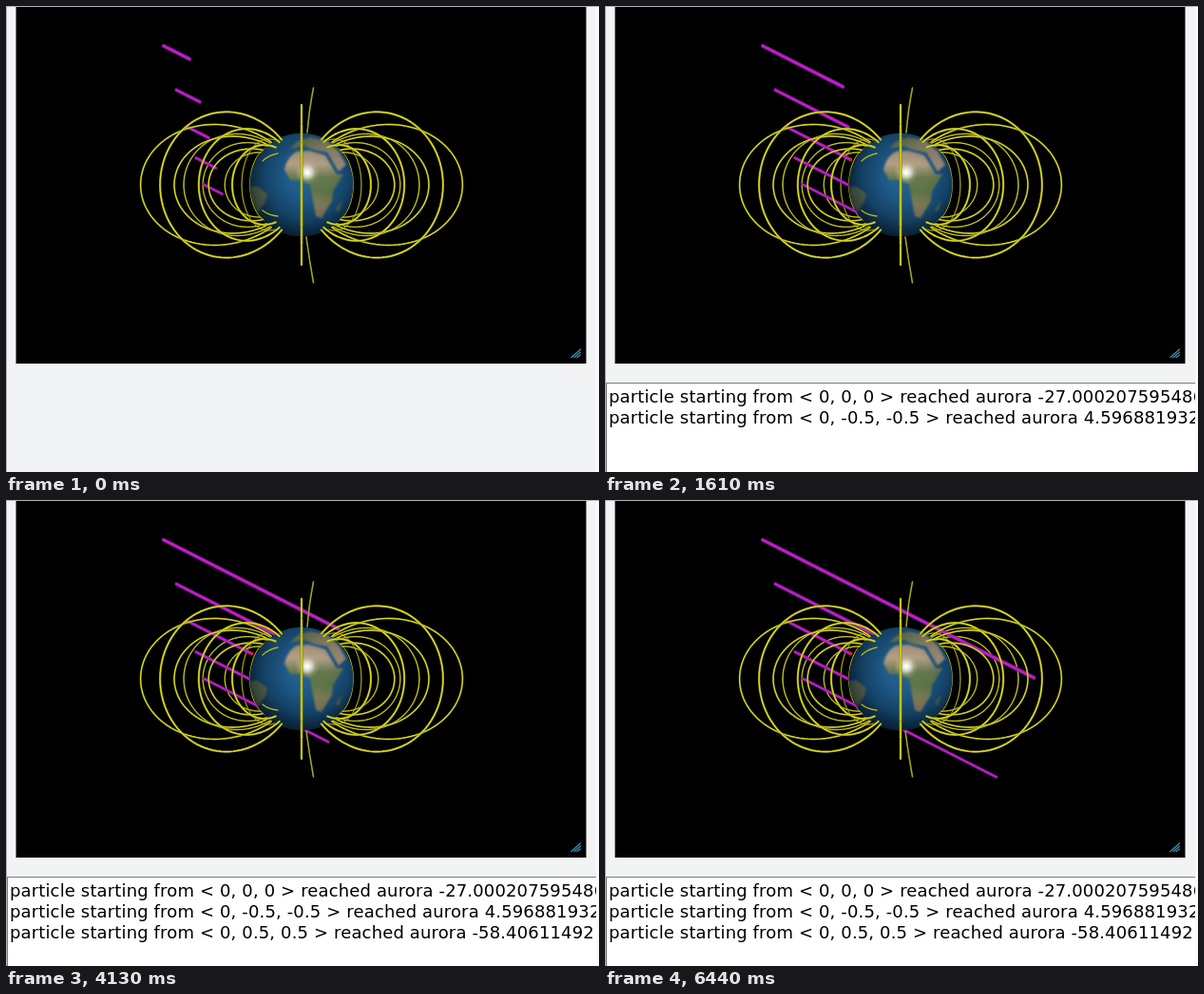
These frames come from a looping animation (624x490 px, 6510 ms). An HTML page with a canvas:

```html
<!DOCTYPE html>
<html lang="en">
<head>
<meta charset="utf-8">
<title>Charged particles in a dipole field</title>
<style>
  html, body { margin: 0; width: 100%; height: 100%; overflow: hidden; background: #f1f3f5; }
  canvas { display: block; width: 624px; height: 490px; }
  #log {
    position: absolute; left: 1px; top: 396px; width: 620px; height: 94px;
    box-sizing: border-box; border: solid #7c7c7c; border-width: 1px 0 0 1px;
    background: #fff; overflow: hidden; display: none;
  }
  #log div {
    position: relative; top: 3px; left: 2px; width: 617px; overflow: hidden; white-space: pre;
    font: 18px/22px Verdana, "DejaVu Sans", sans-serif; letter-spacing: .14px; color: #000;
  }
</style>
</head>
<body>
<canvas id="stage" width="624" height="490"></canvas>
<div id="log"></div>
<script>
const ctx = document.getElementById('stage').getContext('2d');
const log = document.getElementById('log');
const LOOP = 6510, STEP = 70;
const CX = 311, CY = 188, R = 54, EYE = 300;

// Particles that hit the globe, in order of arrival.
const hits = [
  { id: 2, at: 1540, from: '0, 0, 0', value: '-27.000207595486' },
  { id: 3, at: 1610, from: '0, -0.5, -0.5', value: '4.5968819322' },
  { id: 1, at: 2450, from: '0, 0.5, 0.5', value: '-58.40611492' }
];
for (const h of hits) {
  h.row = document.createElement('div');
  h.row.textContent = `particle starting from < ${h.from} > reached aurora ${h.value}`;
  log.appendChild(h.row);
}

function stroke(path, color, width) {
  ctx.strokeStyle = color;
  ctx.lineWidth = width;
  ctx.stroke(path);
}

function tube(path, edge, core, width) {
  stroke(path, edge, width);
  stroke(path, core, width * .55);
}

// Dipole field line r = L sin^2(a) outside the globe, seen in perspective.
function fieldLine(L, azimuth) {
  const path = new Path2D(), n = 80;
  const a0 = Math.asin(Math.sqrt(R / L));
  for (let i = 0; i <= n; i++) {
    const a = a0 + (Math.PI - 2 * a0) * i / n;
    const r = L * Math.sin(a) ** 2, h = r * Math.sin(a);
    const zoom = EYE / (EYE - h * Math.sin(azimuth));
    path.lineTo(CX + h * Math.cos(azimuth) * zoom, CY - r * Math.cos(a) * zoom);
  }
  return { path, depth: Math.sin(azimuth) };
}

const field = [];
for (const L of [150.5, 123, 93]) {
  for (let k = 0; k < 10; k++) field.push(fieldLine(L, (k + .5) * Math.PI / 5));
}
field.sort((a, b) => a.depth - b.depth);
const back = field.filter(f => f.depth < 0), front = field.filter(f => f.depth > 0);

const polar = new Path2D('M317 133Q319 108 323.5 86M316 243Q319 266 323.5 291');
const grazing = new Path2D('M270 163Q276 157 286 155M270 215Q276 220 286 221');

const africa = new Path2D('M293 172Q296 158 306 153L319 152 336 157 348 177H355L344 195 343 205 332 223 326 221 320 188 312 183 299 183Z');
const eurasia = new Path2D('M299 150L307 142 320 138 338 142 350 153 358 167 350 174 338 154 323 151 314 147Z');
const america = new Path2D('M257 190H265L275 198 273 206 265 218 259 206Z');
const madagascar = new Path2D('M354 204L350 217 347 214Z');

function drawField(lines) {
  for (const f of lines) tube(f.path, '#8b8b10', '#dfdf22', 1.6 + .8 * f.depth);
}

// Each particle starts one step further away, so it looks smaller by this factor.
const scaleOf = id => 1 / (1 + .1 * id);

function drawParticle(id, t) {
  const hit = hits.find(h => h.id === id);
  const s = scaleOf(id), sec = Math.min(t, hit ? hit.at : LOOP) / 1000;
  const x = 313 - 147 * s, y = 552 - 510 * s;
  const run = s * (27 + 34 * sec + .95 * sec * sec);
  const path = new Path2D();
  path.moveTo(x, y);
  path.lineTo(x + run, y + run * .508);
  tube(path, '#8a1494', '#be20cb', 3.9 * s + .3);
  if (hit && t >= hit.at) {
    ctx.fillStyle = '#e02418';
    ctx.beginPath();
    ctx.arc(x + run, y + run * .508, 1.8, 0, 7);
    ctx.fill();
  }
}

function gradient(g, colors) {
  colors.forEach((c, i) => g.addColorStop(i / (colors.length - 1), c));
  return g;
}

function glow(x, y, r0, r1, ...colors) {
  ctx.fillStyle = gradient(ctx.createRadialGradient(x, y, r0, x, y, r1), colors);
  ctx.fillRect(CX - R - 2, CY - R - 2, 2 * R + 4, 2 * R + 4);
}

function drawGlobe() {
  ctx.save();
  ctx.beginPath();
  ctx.arc(CX, CY, R + .3, 0, 7);
  ctx.clip();
  glow(317, 178, 4, 66, '#27648f', '#1e5a88', '#174b74', '#103550');
  ctx.filter = 'blur(0.8px)';
  ctx.fillStyle = gradient(ctx.createLinearGradient(0, 152, 0, 223),
    ['#a08d76', '#b49f86', '#66794f', '#5c7548', '#84805a', '#857a5c']);
  ctx.fill(africa);
  ctx.fillStyle = gradient(ctx.createLinearGradient(315, 142, 350, 168), ['#66704f', '#8a8268', '#a5927c']);
  ctx.fill(eurasia);
  ctx.fillStyle = '#5b694f';
  ctx.fill(america);
  ctx.fill(madagascar);
  ctx.filter = 'none';
  glow(316, 180, 22, 68, 'rgba(0,10,20,0)', 'rgba(0,10,20,.14)', 'rgba(0,10,20,.6)');
  glow(317, 175, 1, 13, '#fff', 'rgba(255,255,245,.65)', 'rgba(255,255,240,.15)', 'rgba(255,255,240,0)');
  ctx.restore();
}

function box(color, x, y, w, h) {
  ctx.fillStyle = color;
  ctx.fillRect(x, y, w, h);
}

function drawPage() {
  box('#f1f3f5', 0, 0, 624, 490);
  box('#fafafa', 621, 1, 3, 489);
  box('#b5b6b8', 0, 0, 624, 1);
  box('#b5b6b8', 0, 0, 1, 490);
  box('#000', 10.5, 1, 600, 375);
  for (let i = 0; i < 3; i++) {
    stroke(new Path2D(`M${595 + 3 * i} 369.5L604.5 ${361 + 3 * i}`), '#3f86a6', 1.5);
  }
}

function draw(t) {
  ctx.lineCap = ctx.lineJoin = 'round';
  drawPage();
  drawField(back);
  for (let id = 0; id < 5; id++) drawParticle(id, t);
  drawGlobe();
  drawField(front);
  tube(polar, '#6f6f12', '#b4b422', 1.7);
  tube(grazing, '#85850f', '#d0d030', 1.4);
  log.style.display = t >= hits[0].at ? 'block' : 'none';
  for (const h of hits) h.row.style.visibility = t >= h.at ? 'inherit' : 'hidden';
}

const start = performance.now();
function tick() {
  const t = (performance.now() - start) % LOOP;
  draw(Math.floor(t / STEP) * STEP);
  requestAnimationFrame(tick);
}
tick();
</script>
</body>
</html>
```
